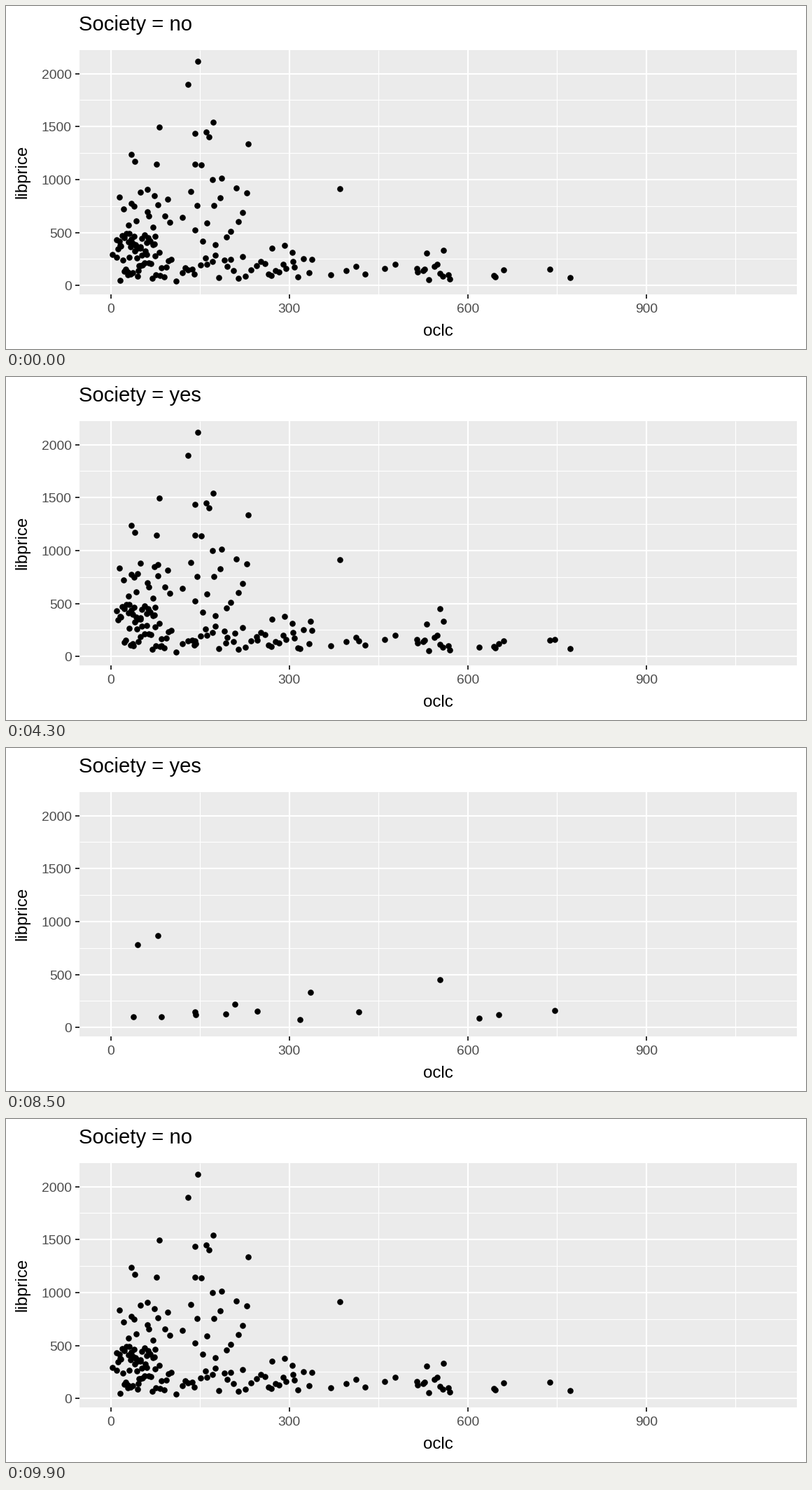
These frames come from a looping animation (1143 px wide and 490 px high, 10000 ms). A matplotlib script:

```python
import matplotlib.pyplot as plt
import numpy as np
from matplotlib.animation import FuncAnimation

W, H, DPI = 1143, 490, 64
FRAMES, INTERVAL = 100, 100
LEAVE, RETURN, STEPS = 29, 78, 21
LEFT, RIGHT, TOP, BOTTOM = 105, 1130, 62.5, 411.5

rng = np.random.default_rng(11)


def cloud(n, x0, x1, y0, y1):
    """Evenly spread random points: one per column and one per row."""
    u = (np.arange(n) + rng.random(n)) / n
    v = (rng.permutation(n) + rng.random(n)) / n
    return np.column_stack([x0 + (x1 - x0) * u, y0 + (y1 - y0) * v])


# "yes" points; the last three come from outside the main cloud.
YES = np.array([
    (186, 384.5), (198.5, 240.5), (250, 224.5), (251.5, 379.5),
    (305, 391), (311, 385.5), (373.5, 385), (409, 381),
    (444, 371.5), (542.5, 392), (564, 352), (976.5, 392), (1083.5, 392),
    (595, 384.5), (829, 365), (886, 392),
])
NO = np.vstack([rng.permutation(cloud(13, 152, 200, 334, 394)),
                [(321, 362), (202, 262), (256, 374)]])

# Points that exist only for "no": the outliers, then the crowd.
OUTLIERS = np.array([
    (274, 78.5), (259.5, 112), (296, 166), (218.5, 173), (269.5, 182),
    (286, 179.5), (290, 187), (346, 196.5), (178.5, 212), (183.5, 222),
    (215, 225.5), (270, 225.5), (279, 226.5), (308, 246), (295, 248),
    (329, 259.5), (477, 260.5), (601, 353), (624.5, 349),
    (711, 377), (776.5, 375.5), (805.5, 388),
])
CROWD = np.vstack([
    cloud(15, 160, 238, 265, 318),
    cloud(14, 250, 347, 260, 346),
    cloud(25, 157, 215, 324, 348),
    cloud(24, 168, 236, 350, 390),
    cloud(17, 243, 345, 355, 394),
    cloud(16, 347, 440, 360, 388),
    cloud(3, 375, 425, 339, 352),
    cloud(6, 458, 560, 367, 387),
    cloud(11, 583, 638, 369, 392),
    cloud(2, 696, 701, 381, 390),
])


def pt(px):
    return px * 72 / DPI


def line(xs, ys, color, width, z):
    ax.plot(xs, ys, color=color, lw=pt(width), solid_capstyle="butt", zorder=z)


def label(x, y, text, px, color="black", **kw):
    return ax.text(x, y, text, fontsize=pt(px), color=color,
                   family="Liberation Sans", va="baseline", **kw)


def dots(xy):
    return ax.plot(xy[:, 0], xy[:, 1], "o", color="black", ms=pt(8.6),
                   mew=0, zorder=5)[0]


def x_px(value):
    return 149.7 + value * 0.85


def y_px(value):
    return 399.2 - value * 0.1513


fig = plt.figure(figsize=(W / DPI, H / DPI), dpi=DPI, facecolor="white")
ax = fig.add_axes([0, 0, 1, 1])
ax.set_xlim(0, W)
ax.set_ylim(H, 0)
ax.axis("off")

ax.add_patch(plt.Rectangle((LEFT, TOP), RIGHT - LEFT, BOTTOM - TOP,
                           fc="#EBEBEB", ec="none", zorder=0))

for v in range(150, 1200, 300):
    line([x_px(v)] * 2, [TOP, BOTTOM], "white", 1.1, 1)
for v in range(250, 2000, 500):
    line([LEFT, RIGHT], [y_px(v)] * 2, "white", 1.1, 1)
for v in range(0, 1000, 300):
    x = x_px(v)
    line([x, x], [TOP, BOTTOM], "white", 2.1, 2)
    line([x, x], [BOTTOM, BOTTOM + 6], "#333333", 2, 2)
    label(x, 438.5, str(v), 19.3, "#4D4D4D", ha="center")
for v in range(0, 2001, 500):
    y = y_px(v)
    line([LEFT, RIGHT], [y, y], "white", 2.1, 2)
    line([LEFT - 6, LEFT], [y, y], "#333333", 2, 2)
    label(94, y + 7, str(v), 19.3, "#4D4D4D", ha="right")

label(617.5, 470.7, "oclc", 24.1, ha="center")
label(29.8, 237, "libprice", 24.1, ha="center", rotation=90,
      rotation_mode="anchor")
title = label(104, 35, "", 29.3, ha="left")

rest = dots(np.vstack([OUTLIERS, CROWD]))
movers = dots(NO)


def draw(i):
    back = i >= RETURN
    t = np.clip((i - (RETURN if back else LEAVE)) / STEPS, 0, 1)
    k = 1 - t if back else t
    xy = NO + (YES - NO) * k
    movers.set_data(xy[:, 0], xy[:, 1])
    rest.set_visible(bool(t == 1 if back else t < 1))
    yes = (t > 0.55) != back
    title.set_text("Society = " + ("yes" if yes else "no"))
    return movers, rest, title


anim = FuncAnimation(fig, draw, frames=FRAMES, interval=INTERVAL,
                     repeat=True, repeat_delay=0, blit=False)
plt.show()
```
